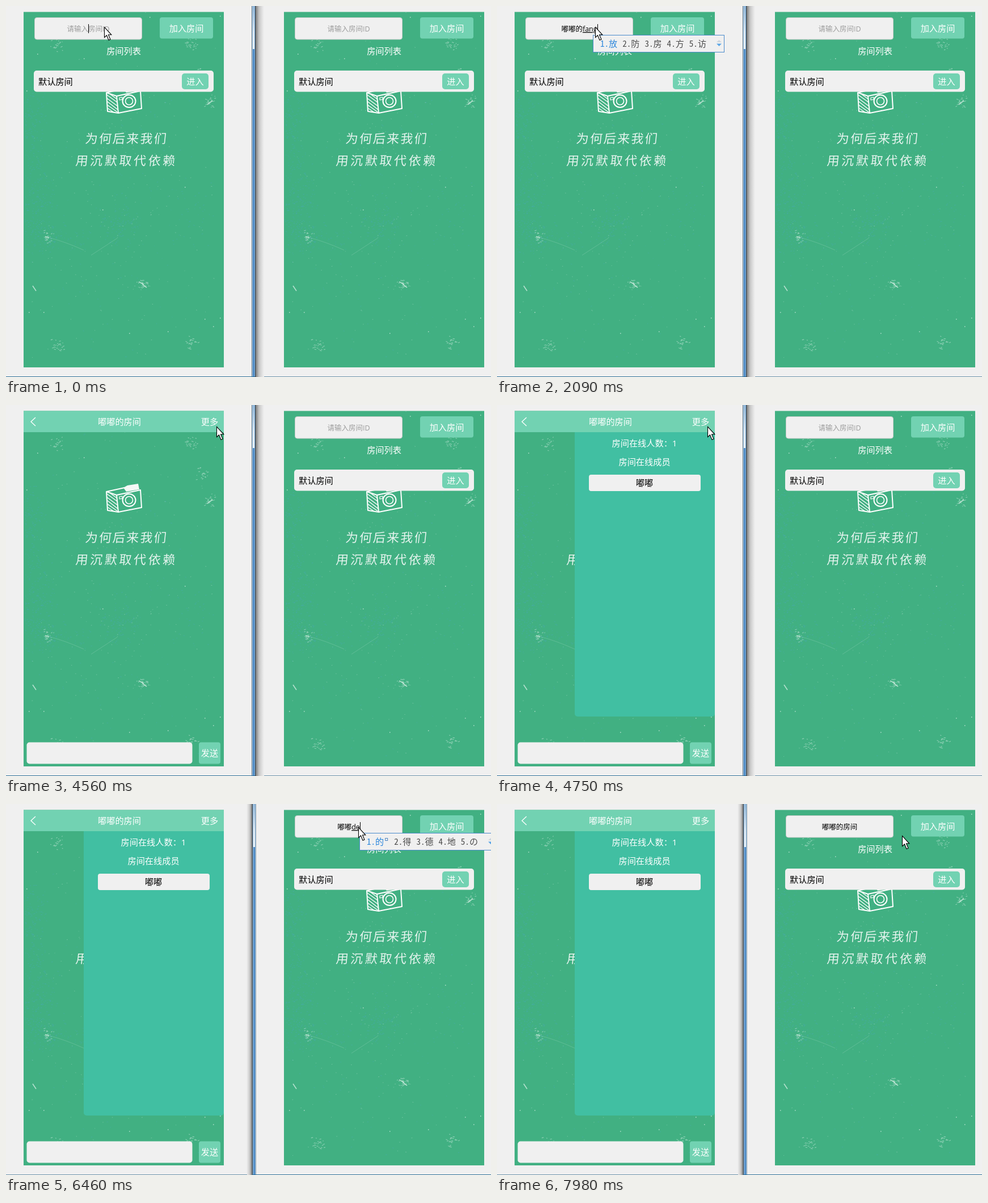
Animation of 855x655 px, one loop 8 s. Source, as an HTML page:

```html
<!DOCTYPE html>
<html lang="zh-CN">
<head>
<meta charset="utf-8">
<title>房间</title>
<style>
  html, body { margin: 0; width: 100%; height: 100%; overflow: hidden; background: #f0f0f0; }
  svg { display: block; width: 855px; height: 655px; }
  text { font: 15.2px "Open Sans", "Noto Sans CJK SC", "Noto Sans CJK", sans-serif; white-space: pre; }
  .small { font-size: 12.5px; }
  .hand { font-size: 22px; font-weight: 300; letter-spacing: 2.2px; }
  .wide { letter-spacing: 3.6px; }
  .ime text { font-family: "Noto Sans Mono CJK SC", "Noto Sans CJK SC", "Noto Sans CJK", monospace; font-size: 15.1px; font-weight: 300; }
  .comp { text-decoration: underline; }
</style>
</head>
<body>
<svg id="stage" viewBox="0 0 855 655"></svg>
<script>
const STEP = 190, LOOP = 8000, RIGHT = 459;
const GREEN = '#41b082', MINT = '#72d2b2', PALE = '#f0f0f0';
const stage = document.getElementById('stage');
const $ = id => document.getElementById(id);

const rect = (x, y, w, h, fill, r = 0, extra = '') =>
  `<rect x="${x}" y="${y}" width="${w}" height="${h}" rx="${r}" fill="${fill}" ${extra}/>`;
const label = (x, y, str, fill = '#fff', anchor = 'middle', cls = '') =>
  `<text x="${x}" y="${y}" fill="${fill}" text-anchor="${anchor}" class="${cls}">${str}</text>`;
const line = (d, width = 1, extra = '') =>
  `<path d="${d}" fill="none" stroke="#fff" stroke-width="${width}" ${extra}/>`;

function randomizer(seed) {
  return () => (seed = (seed * 16807) % 2147483647) / 2147483647;
}

// Chalkboard wear: loose dust, tinted smudges and bright chips.
function texture() {
  const rnd = randomizer(4711);
  const scatter = (n, cx, cy, rx, ry, max) => {
    let d = '';
    for (let i = 0; i < n; i++) {
      const x = cx + (rnd() + rnd() - 1) * rx, y = cy + (rnd() + rnd() - 1) * ry;
      if (x < 32 || x > 381 || y < 11 || y > 636) continue;
      d += `M${x.toFixed(1)} ${y.toFixed(1)}l${(.8 + rnd() * max).toFixed(1)} ${((rnd() - .5) * max).toFixed(1)}`;
    }
    return d;
  };
  const smudges = [[45, 200, 32, 70, 150], [45, 345, 50, 110, 330], [200, 390, 40, 45, 110],
    [90, 410, 70, 35, 90], [330, 370, 60, 70, 40], [200, 330, 180, 320, 160]];
  const chips = [[326, 66], [90, 70], [345, 122], [361, 170], [72, 407], [240, 490], [326, 594], [90, 602]];
  const dots = [[253, 20], [377, 18], [36, 150], [40, 541], [66, 541], [377, 551], [350, 553],
    [365, 566], [285, 575], [315, 320], [170, 360], [55, 85], [137, 93], [217, 578]];
  return line(smudges.map(([x, y, rx, ry, n]) => scatter(n, x, y, rx, ry, 2)).join(''), 1,
      'style="stroke:#48abac" opacity=".65"')
    + line(scatter(260, 207, 324, 200, 350, 1), 1, 'opacity=".25"')
    + line(chips.map(([x, y]) => scatter(22, x, y, 13, 14, 3)).join(''), 1.1, 'opacity=".38"')
    + line(dots.map(([x, y]) => `M${x} ${y}h1.5`).join(''), 1.5, 'opacity=".6"')
    + line('M47 494l6 9M234 487l9 4M240 491l8 6M355 174l9-7M69 407l7 2', 1.6, 'opacity=".6"')
    + line('M76 409Q104 416 137 431M150 440L196 410', .8, 'opacity=".2"');
}

const camera = () => '<g stroke-linejoin="round" stroke-linecap="round">'
  + line('M177 153L195 159L198 189L179 186ZM195 159L237 150L239 181L198 189M177 153L209 146', 2)
  + line('M178 157L196 170M178 163L197 177M179 169L197 183M179 175L196 187M180 181L189 187M184 156L195 164', 1.4)
  + '<path d="M207 146L214 142L233 139L235 149L212 153Z" fill="#f4f8f6"/>'
  + line('M200 162l5-1l0 4l-5 1Z', 1.2)
  + '<g fill="none" stroke="#fff"><ellipse cx="217" cy="168" rx="11.5" ry="11" stroke-width="2"/>'
  + '<circle cx="217" cy="168" r="6.5" stroke-width="1.6"/></g></g>';

const handwriting = (x, y, str, cls) =>
  `<g transform="translate(${x} ${y}) skewX(-6)">${label(0, 0, str, '#fff', 'start', cls)}</g>`;

const wallpaper = () => rect(31, 10.5, 353, 627.5, GREEN) + texture() + camera()
  + '<g opacity=".86">' + handwriting(139, 242, '为何后来我们', 'hand')
  + handwriting(122, 281, '用沉默取代依赖', 'hand wide') + '</g>';

const lobby = side => `<g id="lobby${side}" transform="translate(${side * RIGHT})">`
  + rect(50.5, 20.5, 189, 38.5, PALE, 4, 'stroke="#c4cbc8"')
  + label(145, 45, '请输入房间ID', '#9c9c9c', 'middle', 'small').replace('<text', `<text id="hint${side}"`)
  + `<text id="entry${side}" class="small" x="145" y="45" text-anchor="middle"><tspan></tspan><tspan class="comp"></tspan></text>`
  + rect(145, 32, 1, 16, '#000', 0, `id="caret${side}"`)
  + rect(271, 20, 94, 37.5, MINT, 4) + label(318, 45, '加入房间')
  + label(207.5, 85, '房间列表')
  + rect(49, 114, 317, 37.5, PALE, 5) + label(57, 139, '默认房间', '#000', 'start')
  + rect(310, 119, 47, 28, MINT, 5) + label(333.5, 139, '进入') + '</g>';

const room = () => '<g id="room">'
  + '<g id="members"><path d="M384 48H137V545a5 5 0 0 0 5 5H379a5 5 0 0 0 5-5Z" fill="#41bfa2"/>'
  + label(260, 73, '房间在线人数：1') + label(260, 106, '房间在线成员')
  + rect(162, 123, 197, 29, PALE, 4) + label(260, 143, '嘟嘟', '#000') + '</g>'
  + rect(31, 10.5, 353, 37.5, MINT) + line('M52 22L44 29.5L52 37', 1.3)
  + label(200, 35, '嘟嘟的房间') + label(359, 35, '更多')
  + rect(36.5, 595.5, 292, 38, PALE, 5) + rect(340, 595.5, 38, 38, MINT, 4) + label(359, 620, '发送') + '</g>';

// Window border between the two phones; the active window casts the shadow.
const border = (x, inner, outer) => rect(x + 1, 0, 6, 655, '#4f8ac4')
  + rect(x + 1, 0, 6, 76, 'url(#gloss)') + rect(x + 1, 0, 1, 655, '#a9cdea')
  + rect(x + 5, 0, 1, 655, '#8fbce2') + rect(x, 0, 1, 655, inner) + rect(x + 6, 0, 1, 655, outer);
const edges = () => '<g id="edge0">' + border(433, '#5f7180', '#2c3c4a')
  + rect(440, 0, 15, 655, 'url(#shadeR)')
  + rect(0, 654, 439, 1, '#2f7099') + rect(455, 654, 400, 1, '#6d93ab') + '</g>'
  + '<g id="edge1">' + border(434, '#2c3c4a', '#8c99a4')
  + rect(424, 0, 10, 655, 'url(#shadeL)')
  + rect(0, 654, 425, 1, '#6d93ab') + rect(434, 654, 421, 1, '#2f7099') + '</g>';

const ramp = (id, stops, axis = '') => `<linearGradient id="${id}" ${axis}>`
  + stops.map(([at, color, alpha = 1]) => `<stop offset="${at}" stop-color="${color}" stop-opacity="${alpha}"/>`).join('')
  + '</linearGradient>';

stage.innerHTML = '<defs>'
  + ramp('shadeR', [[0, '#333', .65], [.4, '#555', .28], [1, '#777', 0]])
  + ramp('shadeL', [[0, '#777', 0], [.6, '#555', .28], [1, '#333', .65]])
  + ramp('gloss', [[0, '#8fb4d6'], [.6, '#dbe7f1'], [1, '#e8f0f6']], 'x2="0" y2="1"')
  + `<g id="paper">${wallpaper()}</g></defs>`
  + rect(0, 0, 855, 655, PALE) + edges()
  + `<use href="#paper"/><use href="#paper" x="${RIGHT}"/>`
  + lobby(0) + lobby(1) + room() + '<g id="ime" class="ime"></g>'
  + '<path id="cursor" d="M.5 .5V18.5L4.5 14.8L8 23.3L11 22L7.5 13.8H12.8Z" fill="#fff" stroke="#000" stroke-width="1.1"/>';

const show = (id, on) => $(id).style.display = on ? '' : 'none';
const columns = str => [...str].reduce((n, c) => n + (c > '\u2e7f' || c === 'ε' ? 2 : 1), 0);

// Candidate bar; "°" after a candidate stands for the small square badge.
function imeBar(left, words) {
  let x = left + 13, items = '';
  words.forEach((word, i) => {
    const badge = word.endsWith('°');
    const str = `${i + 1}.${word.replace('°', '')}`;
    items += label(x.toFixed(1), 72, str, i ? '#4c4c4c' : '#2b86dc', 'start');
    x += columns(str) * 7.55;
    if (badge) {
      items += rect(x + 2.5, 60.5, 4, 4, 'none', 0, 'stroke="#4a83c0"');
      x += 9;
    }
    x += 9;
  });
  const right = Math.round(x + 23);
  return rect(left + .5, 51.5, right - left - 1, 30, PALE, 0, 'stroke="#4a8bcb"') + items
    + `<path d="M${right - 14} 64l4.5-4l4.5 4Z" fill="#cfd6dc"/><path d="M${right - 14} 66.5h9l-4.5 4.5Z" fill="#5aa5e6"/>`;
}

const words = {
  d: '的 大 到 都 对', du: '度 都 读 独 毒', dud: '嘟嘟 读的 都到 度对 读懂',
  dudu: '嘟嘟|都都|读读|肚肚|(* ￣3)(ε￣ *)', de: '的° 得 德 地 の',
  f: '放 发 分 非 飞', fa: '发 法 罚 乏 伐', fang: '放 防 房 方 访',
  fangj: '房间 房价 放假 方剂 房介', fangji: '房间 方剂 房价 放几 防己', fangjian: '房间 防检 方见 仿建 放'
};
const barLeft = { 0: 152, 2: 164, 3: 169 };

const type = (text, comp = '', caret = true) => ({ text, comp, caret });
const move = (x, y) => ({ cursor: [x, y] });
const script = [
  [0, { side: 0, room: false, members: false, ...type(''), ...move(173, 37) }],
  [1, type('', 'd')], [2, type('', 'du')], [3, type('', 'dud')], [4, type('', 'dudu')],
  [6, type('嘟嘟')], [7, type('嘟嘟', 'd')], [8, type('嘟嘟', 'de')], [9, type('嘟嘟的')],
  [10, type('嘟嘟的', 'fa')], [11, type('嘟嘟的', 'fang')], [12, type('嘟嘟的', 'fangj')],
  [13, type('嘟嘟的房间')], [14, move(215, 38)], [15, move(302, 41)],
  [16, { caret: false }], [17, { room: true, text: '' }],
  [19, move(420, 36)], [20, move(560, 44)], [21, move(628, 50)], [22, move(600, 46)],
  [23, move(470, 33)], [24, move(371, 38)], [25, { members: true }],
  [27, move(450, 42)], [28, move(560, 44)], [29, move(621, 41)], [30, { side: 1, ...type('') }],
  [31, type('', 'd')], [32, type('', 'dudu')], [33, type('嘟嘟')], [34, type('嘟嘟', 'de')],
  [35, type('嘟嘟的')], [36, type('嘟嘟的', 'fa')], [37, type('嘟嘟的', 'fang')],
  [38, type('嘟嘟的', 'fangji')], [39, type('嘟嘟的', 'fangjian')], [40, type('嘟嘟的房间')],
  [41, { ...move(660, 47), caret: false }], [42, move(714, 56)]
];

let shown = -1;
function render(step) {
  if (step === shown) return;
  shown = step;
  const s = Object.assign({}, ...script.filter(([at]) => at <= step).map(([, change]) => change));
  show('lobby0', !s.room);
  show('room', s.room);
  show('members', s.members);
  for (const side of [0, 1]) {
    const active = s.side === side, entry = $('entry' + side);
    show('edge' + side, active);
    show('hint' + side, !active || !(s.text + s.comp));
    show('caret' + side, active && s.caret);
    entry.children[0].textContent = active ? s.text : '';
    entry.children[1].textContent = active ? s.comp : '';
    if (active && !(side === 0 && s.room)) {
      $('caret' + side).setAttribute('x', Math.round(145 + entry.getComputedTextLength() / 2));
    }
  }
  const list = words[s.comp];
  $('ime').innerHTML = list
    ? imeBar(barLeft[s.text.length] + s.side * RIGHT, list.split(list.includes('|') ? '|' : ' ')) : '';
  $('cursor').setAttribute('transform', `translate(${s.cursor})`);
}

const start = performance.now();
function tick() {
  render(Math.floor(((performance.now() - start) % LOOP) / STEP));
  requestAnimationFrame(tick);
}
tick();
</script>
</body>
</html>
```
